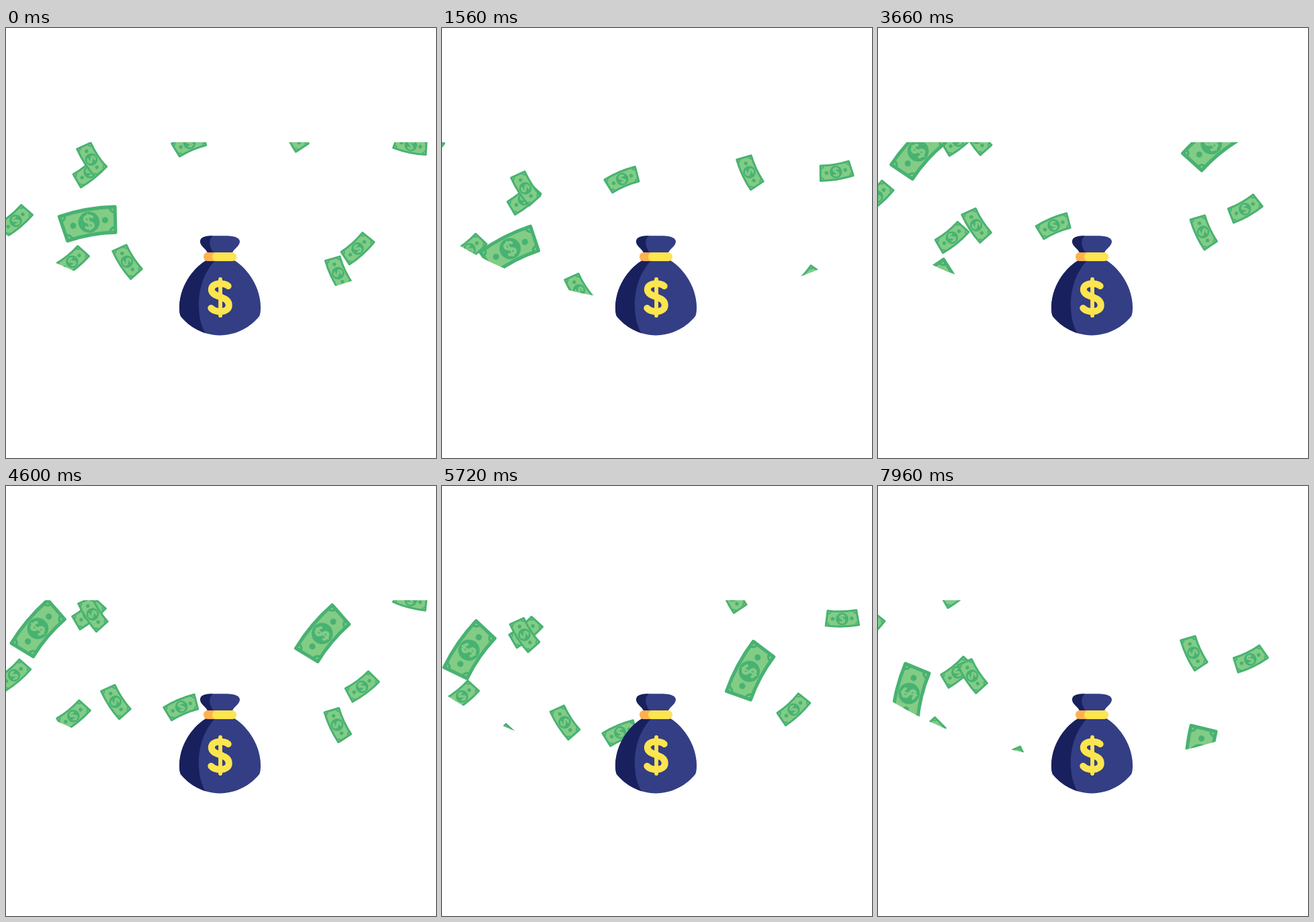
An HTML page with a canvas for the animation above (8 s loop, 640 by 640 pixels).

```html
<!DOCTYPE html>
<html>
<head>
<meta charset="utf-8">
<style>
  html, body { margin: 0; height: 100%; overflow: hidden; background: #fff; }
  canvas { display: block; }
</style>
</head>
<body>
<canvas id="stage" width="640" height="640"></canvas>
<script>
const ctx = document.getElementById('stage').getContext('2d');
const DARK = '#48b272', LIGHT = '#82cc86';
const NAVY = '#333e84', SHADE = '#18215d', GOLD = '#fde550', ORANGE = '#ffb14e';
const LOOP = 8, FRAME = 0.112;

// Small notes follow each other down the same path, two per cycle.
const CYCLE = 10.34, GAP = 4.77;
const followers = [-1, 0, 1].flatMap(n => [n * CYCLE, n * CYCLE + GAP]);

// x, y and turn (degrees) are polynomials of the seconds since start.
const paths = [
  { start: -3.77, x: [-24.6, 5.7, 1.24], y: [161.3, 37.7, -1.16], turn: [-45, 1.3] },
  { start: -7.77, x: [113.3, 7.4, -1.2], y: [145.5, 21, 0.65], turn: [-39] },
  { start: 0, x: [127, -9.56, 5.47, -0.367], y: [195.7, 27.3], turn: [57] },
  { start: -4.77, x: [429.5, 20, -1.35], y: [158, 32.4, 2.3], turn: [65] },
  { start: 0, x: [602.5, -1.3, -7.11, 0.86], y: [174.3, 24.6, 0.55], turn: [12, -15, 0.95] },
  { start: 0, alone: true, x: [273, -1.54, -1.3, 0.233], y: [171, 34.3], turn: [157] },
  { start: 0, alone: true, size: 1.7, x: [123.5, -14.8, 0.45], y: [289, 24, 0.7], turn: [170, -12.6, 1.1] },
  { start: 2.68, alone: true, size: 1.7, x: [75.5, -20, 2.74], y: [157, 28.8], turn: [132, 1.5, -1.3] },
  { start: 4.6, alone: true, size: 1.7, x: [470.5, -18.8, 6.3], y: [220, 48.6, 1.5], turn: [130, -10.5] }
];

const poly = (terms, t) => terms.reduceRight((sum, c) => sum * t + c, 0);

function dot(x, y, r, color) {
  ctx.fillStyle = color;
  ctx.beginPath();
  ctx.arc(x, y, r, 0, 7);
  ctx.fill();
}

function shape(d, color) {
  ctx.fillStyle = color;
  ctx.fill(new Path2D(d));
}

const curl = new Path2D('M11.5-16C7-21-12-21.5-12-11C-12 1 12.5-3 12.5 11C12.5 22-7 22-12.5 15');
const bar = new Path2D('M.5-25.5V25.5');
function dollar(x, y, scale, color) {
  ctx.save();
  ctx.translate(x, y);
  ctx.scale(scale, scale);
  ctx.strokeStyle = color;
  ctx.lineCap = 'round';
  ctx.lineWidth = 9.4;
  ctx.stroke(curl);
  ctx.lineWidth = 5.5;
  ctx.stroke(bar);
  ctx.restore();
}

// A banknote is a slice of a ring, bent around a point far above it.
const BEND = 153, HALF = 0.151, EDGE = 11.2;
const onArc = (angle, r) => [Math.sin(angle) * r, Math.cos(angle) * r - BEND];

const note = new Path2D();
note.arc(0, -BEND, BEND + EDGE, Math.PI / 2 - HALF, Math.PI / 2 + HALF);
note.arc(0, -BEND, BEND - EDGE, Math.PI / 2 + HALF, Math.PI / 2 - HALF, true);
note.closePath();

function bill(x, y, turn, size) {
  ctx.save();
  ctx.translate(x, y);
  ctx.rotate(turn * Math.PI / 180);
  ctx.scale(size, size);
  ctx.fillStyle = LIGHT;
  ctx.fill(note);
  ctx.save();
  ctx.clip(note);
  ctx.strokeStyle = DARK;
  ctx.lineWidth = 2;
  for (const side of [-1, 1]) {
    for (const edge of [-EDGE, EDGE]) {
      ctx.beginPath();
      ctx.arc(...onArc(side * HALF, BEND + edge), 4.8, 0, 7);
      ctx.stroke();
    }
    dot(...onArc(side * 14.2 / BEND, BEND), 2.7, DARK);
  }
  ctx.restore();
  ctx.strokeStyle = DARK;
  ctx.lineWidth = 3;
  ctx.lineJoin = 'round';
  ctx.stroke(note);
  dot(0, 0, 9.3, DARK);
  dollar(0, 0, 0.27, LIGHT);
  ctx.restore();
}

function band(x, w, color) {
  ctx.fillStyle = color;
  ctx.beginPath();
  ctx.roundRect(x, 334, w, 13, 6);
  ctx.fill();
}

function shaded(outline, shadow) {
  shape(outline, NAVY);
  ctx.save();
  ctx.clip(new Path2D(outline));
  shape(shadow, SHADE);
  ctx.restore();
}

function bag() {
  shaded('M298 346C276 359 258 387 258 416Q258 425 260 429C273 445 293 457 318 457.5C344 457 364 445 377 429Q379 425 379 416C379 387 361 359 340 346Z',
    'M312 345C290 368 286 398 287 418Q288 442 299 458H250V345Z');
  shaded('M301 336C297 327 289 325 289 317.5C290 308 305 309.5 318 309.3C335 309 347 310 348 317.5C348 325 340 327 336 336Z',
    'M309 308C301 314 301 325 311 337H280V308Z');
  band(294, 30, ORANGE);
  band(307, 36, GOLD);
  dollar(318.5, 401, 1.06, GOLD);
}

function draw(seconds) {
  // The small allowance lands each pose on its 20 ms grid.
  const time = Math.floor((seconds % LOOP + 0.008) / FRAME) * FRAME;
  ctx.clearRect(0, 0, 640, 640);
  ctx.save();
  ctx.beginPath();
  ctx.rect(0, 170, 640, 300);
  ctx.clip();
  ctx.beginPath();
  ctx.arc(328, -183, 590, 0, 7);
  ctx.clip();
  for (const { start, alone, size = 1, x, y, turn } of paths) {
    for (const delay of alone ? [0] : followers) {
      const t = time - start - delay;
      bill(poly(x, t), poly(y, t), poly(turn, t), size);
    }
  }
  ctx.restore();
  bag();
}

const begin = performance.now();
function tick() {
  draw((performance.now() - begin) / 1000);
  requestAnimationFrame(tick);
}
tick();
</script>
</body>
</html>
```
